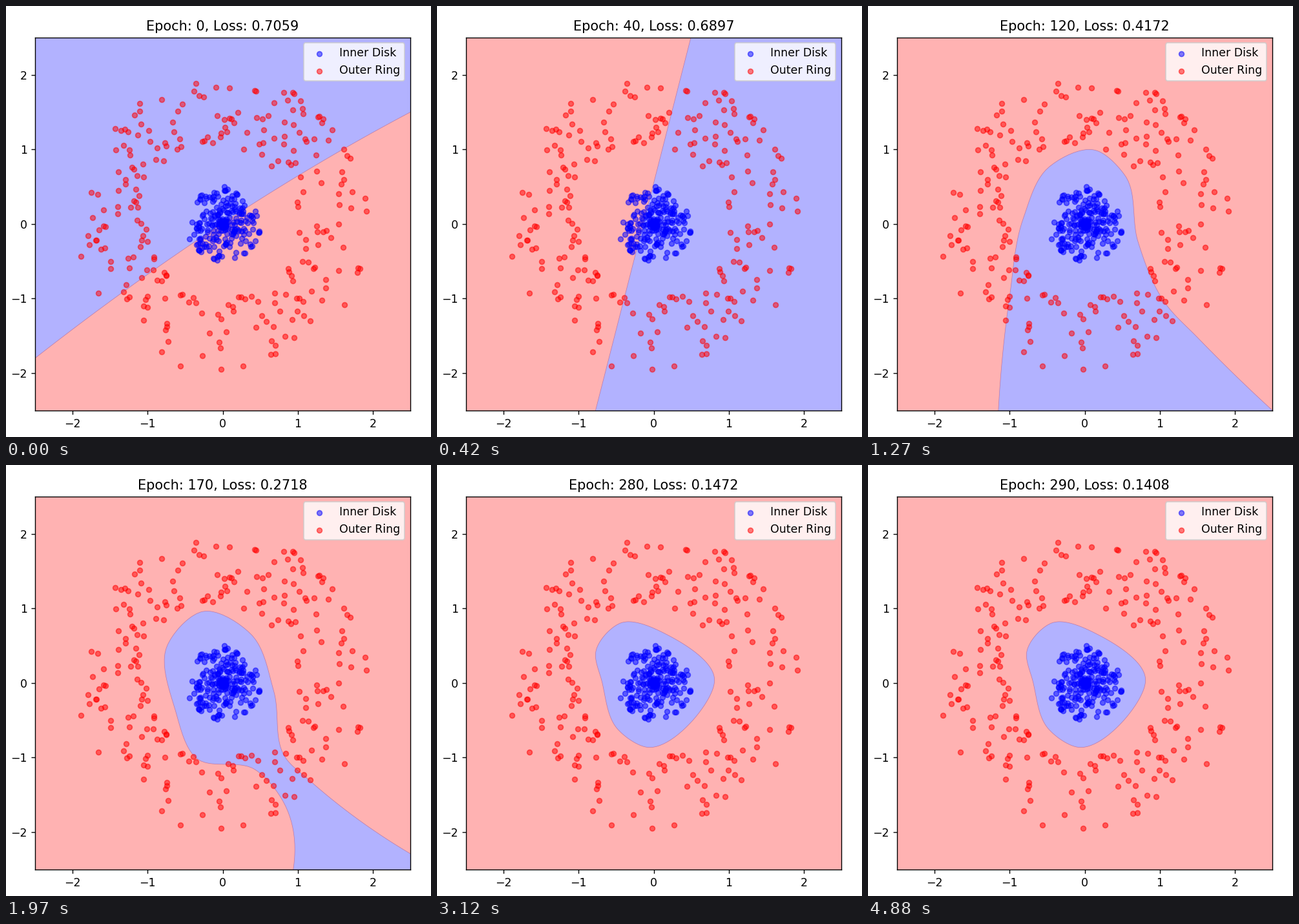
Recreate the animation shown at these times as a matplotlib script. Size 658 by 668 pixels, loop 4.91 s.

```python
import numpy as np
import matplotlib.pyplot as plt
from matplotlib.animation import FuncAnimation
from matplotlib.path import Path

W, H, DPI = 658, 668, 125
LOOP, FRAMES = 4910, 154
LEFT, TOP, AX_W, AX_H = 44.95, 48.8, 581.2, 578.0
RED_BG, BLUE_BG, EDGE = "#ffb2b2", "#b2b2ff", "#b878a8"

plt.rcParams["font.family"] = "DejaVu Sans"


def ring(n, r0, width):
    angle = 2 * np.pi * np.random.rand(n)
    r = r0 + width * np.random.rand(n)
    return r * np.cos(angle), r * np.sin(angle)


def hermite(x, xs, ys, edge_order=1):
    """Smooth curve through (xs, ys); ys may hold one column per coordinate."""
    m = np.gradient(ys, xs, axis=0, edge_order=edge_order)
    i = np.clip(np.searchsorted(xs, x, "right") - 1, 0, len(xs) - 2)
    h = xs[i + 1] - xs[i]
    u = (x - xs[i]) / h
    if ys.ndim > 1:
        h, u = h[:, None], u[:, None]
    return ((1 + 2 * u) * (1 - u)**2 * ys[i] + u * (1 - u)**2 * h * m[i]
            + u * u * (3 - 2 * u) * ys[i + 1] + u * u * (u - 1) * h * m[i + 1])


def smooth_outline(pts, closed, n=120):
    p = np.array(pts, float)
    if closed:
        p = np.vstack([p[-2:], p, p[:3]])
    s = np.r_[0, np.cumsum(np.hypot(*np.diff(p, axis=0).T))]
    first, last = (s[2], s[-3]) if closed else (s[0], s[-1])
    curve = hermite(np.linspace(first, last, n), s, p, edge_order=2)
    if closed:
        return curve

    def extend(end, prev):
        return end + 3 * (end - prev) / np.hypot(*(end - prev))

    return np.vstack([extend(curve[0], curve[1]), curve,
                      extend(curve[-1], curve[-2])])


def region(pts, closed=False):
    """Signed distance to the outline, positive on the blue side."""
    curve = smooth_outline(pts, closed)
    dist = np.full(gx.shape, np.inf)
    for (x0, y0), (x1, y1) in zip(curve, curve[1:]):
        dx, dy = x1 - x0, y1 - y0
        u = ((gx - x0) * dx + (gy - y0) * dy) / (dx * dx + dy * dy + 1e-12)
        u = np.clip(u, 0, 1)
        dist = np.minimum(dist, np.hypot(gx - x0 - u * dx, gy - y0 - u * dy))
    inside = Path(curve).contains_points(np.c_[gx.ravel(), gy.ravel()])
    return np.where(inside.reshape(gx.shape), dist, -dist)


gx, gy = np.meshgrid(np.linspace(-2.52, 2.52, 200), np.linspace(-2.52, 2.52, 200))

# The blue region at key steps: two lines, three open arches, one closed blob
slanted = (gy - 0.01 - 0.66 * gx + 0.0256 * gx**2) / 1.2
upright = (gx + 0.14 - 0.254 * gy) / 1.03
hill = region([(-2.25, -2.5), (-1.27, -.43), (-.56, .39), (.12, .79),
               (.68, .46), (1.16, -.25), (2.5, -1.53)])
arch = region([(-1.15, -2.5), (-1, -.97), (-.82, .07), (-.48, .76), (.14, .99),
               (.53, .66), (.71, -.24), (1.07, -1.06), (1.5, -1.52), (2.5, -2.5)])
pinched = region([(.94, -2.5), (.8, -1.58), (.43, -1.16), (-.35, -1.01),
                  (-.63, -.37), (-.74, .5), (-.26, .96), (.38, .65),
                  (.68, -.11), (.84, -1.01), (1.16, -1.31), (2.5, -2.29)])
blob = region([(-.77, .43), (-.45, .8), (.21, .63), (.81, .04),
               (.58, -.43), (-.1, -.86), (-.48, -.62), (-.69, .02)], closed=True)

KEYS = np.array([0, 4, 7, 12, 17, 28, 29])
FIELDS = [slanted, upright, hill, arch, pinched, blob, blob]
LOSSES = np.array([.7059, .6897, .6408, .4172, .2718, .1472, .1408])


def field_at(step):
    i = min(np.searchsorted(KEYS, step, "right") - 1, len(KEYS) - 2)
    u = (step - KEYS[i]) / (KEYS[i + 1] - KEYS[i])
    if FIELDS[i] is pinched:
        u = 1 - (1 - u)**2
    return (1 - u) * FIELDS[i] + u * FIELDS[i + 1]


def title_at(step):
    loss = np.exp(hermite(step, KEYS, np.log(LOSSES)))
    return f"Epoch: {step * 10}, Loss: {loss:.4f}"


def step_at(ms):
    """Nearly steady pace, a little slower in the middle, then a hold."""
    return int(np.interp(ms, [0, 1240, 1980, 3190], [.75, 12.05, 17.8, 29]))


fig = plt.figure(figsize=(W / DPI, H / DPI), dpi=DPI)
ax = fig.add_axes([LEFT / W, 1 - (TOP + AX_H) / H, AX_W / W, AX_H / H],
                  facecolor=RED_BG)

layers = []
for step in range(KEYS[-1] + 1):
    z = field_at(step)
    layers.append([
        ax.contourf(gx, gy, z, levels=[0, 1e4], colors=[BLUE_BG],
                    antialiased=True, zorder=0.5),
        ax.contour(gx, gy, z, levels=[0], colors=[EDGE],
                   linewidths=0.4, linestyles="solid", zorder=0.6),
    ])

np.random.seed(42)
ax.scatter(*ring(250, 0, 0.5), s=20, c="blue", alpha=0.5, label="Inner Disk")
ax.scatter(*ring(250, 1, 1), s=20, c="red", alpha=0.5, label="Outer Ring")
ax.set(xlim=(-2.5, 2.5), ylim=(-2.5, 2.5),
       xticks=range(-2, 3), yticks=range(-2, 3))
ax.legend(loc="upper right")
title = ax.set_title("")


def update(frame):
    now = step_at(frame * LOOP / FRAMES)
    for step, pair in enumerate(layers):
        for artist in pair:
            artist.set_visible(step == now)
    title.set_text(title_at(now))
    return [title]


anim = FuncAnimation(fig, update, frames=FRAMES, interval=LOOP / FRAMES,
                     repeat=True, repeat_delay=0, blit=False)
plt.show()
```
